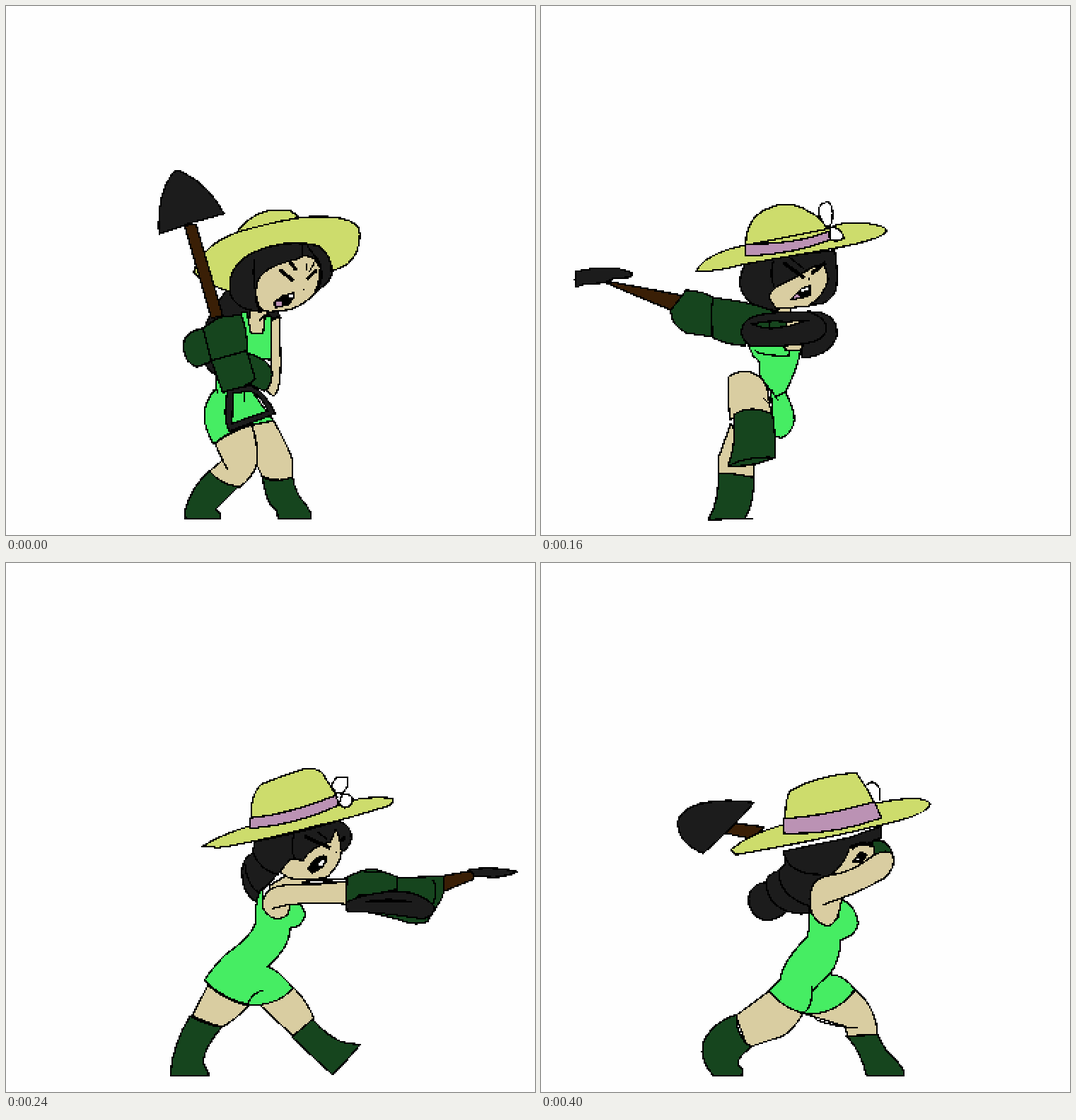
An HTML page with a canvas for the animation above (0.48 s loop, 748 by 748 pixels).

```html
<!DOCTYPE html>
<html lang="en">
<head>
<meta charset="utf-8">
<title>Shovel swing</title>
<style>
html, body { margin: 0; width: 100%; height: 100%; overflow: hidden; background: #fefefe; }
canvas { display: block; width: 748px; height: 748px; image-rendering: pixelated; }
</style>
</head>
<body>
<canvas id="stage" width="374" height="374"></canvas>
<script>
const SIZE = 374, HOLD = 80;

// Fill per letter; "l" is a thin line, "e" a thick one.
const FILL = { h: '#1c1c1c', g: '#16451e', s: '#d9cda1', d: '#46ed63', y: '#cddc6c',
               p: '#bb92b4', b: '#3a1f06', w: '#fefefe', k: '#000' };

// Each line is one part, back to front.
const POSES = [`
h M312,400Q285,440 282,450L281,505Q288,520 298,520L330,440 388,440 380,425Z
y M326,320Q340,297 370,289L400,288 413,297 390,310Z
y M265,377Q275,338 328,319Q400,298 440,297Q500,297 500,322Q500,350 482,365L460,375 316,403Q285,395 270,381Z
s M345,430L368,430 374,440 374,465 340,465Z
s M353,395Q350,430 372,432L392,430Q415,430 440,402L444,370Q430,340 380,340Z
h M316,400Q313,370 345,350Q390,328 440,338Q462,352 460,380Q455,395 437,402Q450,375 441,358L422,352 410,358Q362,368 355,390Q348,420 360,432Q318,428 316,400Z
l M350,358Q348,400 358,425M418,337V356M425,338L443,362Q450,385 440,400
e M386,372L406,388M400,360L410,373M425,386L439,373
l M424,364V374M436,362L428,376M420,400V402
k M378,420L390,410 406,405 407,412 398,422 381,426Z
p M381,425V417L389,416 393,423Z
w M398,406H406V412L400,414Z
l M358,446Q360,438 372,434
s M295,618Q320,600 347,592Q356,620 355,645Q350,665 330,680L300,675 288,657 306,642Z
l M304,640L314,656
s M347,592L378,586Q400,625 404,640V670Q380,672 362,665L354,648Q358,620 347,592Z
g M287,657Q305,678 328,679L296,711 303,718V724H253V712Q262,680 287,657Z
g M362,666Q385,676 405,665Q408,690 425,706L431,718V724H384L383,714Q370,705 366,685Z
s M374,445L386,438 388,500Q388,545 378,551L369,545 374,510Z
d M332,432H340L346,462H363L366,438H374V500L340,495Z
d M296,520L297,541Q276,560 281,590Q287,610 293,619Q310,603 345,592L378,586 340,535Z
l M292,541V548M298,541V548M336,542V560
g M278,455Q252,460 250,480Q252,505 270,510L290,502Z
g M278,455L300,440 332,436Q342,460 340,487L290,501Z
g M340,490Q375,500 376,520Q374,540 365,544L345,535Z
g M290,501L340,487 352,527Q340,540 306,546Z
h M313,543L345,536Q368,546 380,576L315,601Q305,580 313,543ZM321,547L319,590 370,572Q360,550 345,544Z
b M252,310L268,308 306,437 290,441Z
h M236,235Q242,230 252,236Q285,252 308,293Q260,305 216,322Q213,265 236,235Z`, `
h M358,430Q385,440 390,465Q405,478 406,492Q400,515 375,527L357,524Z
l M390,465Q380,482 358,488M399,481Q385,508 358,510M358,470Q372,466 378,448
y M252,357Q255,330 280,315Q310,303 345,312Q360,325 363,342L300,352Z
y M168,402Q172,385 230,366L260,358Q330,346 375,349Q440,352 443,364Q440,377 374,391L250,402 172,408Z
p M250,360Q290,338 352,338L365,348Q300,347 250,360Z
w M364,338Q358,312 366,308Q372,318 369,338Z
w M370,338H384V348H370Z
y M354,342L368,338 370,347H358Z
s M214,465Q215,490 245,495Q265,495 272,488V465Z
s M262,458L355,475 357,494H274Z
s M278,395L285,385 315,375 352,385Q362,420 345,442L285,440 270,425Z
h M245,395Q250,370 290,364Q320,358 360,368Q376,385 380,395Q384,420 372,430L352,442 344,441Q360,420 356,395Q335,392 317,378Q290,384 281,396Q270,410 278,428L262,430Q245,415 245,395Z
l M298,366Q300,380 312,390M340,370L330,388M358,374Q366,400 356,426M264,376Q258,400 270,420
e M280,388L307,409M331,407L348,382
l M340,392H355M320,414V416
k M308,430L316,424 326,428V440L308,436Z
w M310,430L318,426 323,432 310,435Z
s M258,595Q290,594 316,606Q300,640 299,660Q280,672 253,665Q240,630 245,615Z
s M316,606L378,630Q380,640 389,650Q370,675 345,672Q318,650 316,606Z
l M299,645L288,658
g M251,660Q270,677 302,658Q308,690 308,724H253Q258,700 251,660Z
g M345,672Q370,678 391,650Q415,680 428,724H370V710Q368,695 345,672Z
d M276,466Q285,462 295,473L320,478 327,474 340,488 357,491Q358,520 348,543Q378,580 378,602V630Q330,605 258,595Q270,565 295,540Q302,520 300,506Q275,504 273,485Z
l M304,494Q310,513 337,513M378,600V655M348,541L342,548
s M265,425Q310,430 345,442Q357,450 356,490L342,488Q335,475 320,472Q290,462 260,462Z
g M186,404Q160,425 158,455Q170,467 190,462L202,460 201,430 210,404Z
g M178,410Q192,370 212,364Q240,368 245,406L205,404Z
g M205,408Q240,400 270,418Q255,440 266,465L255,471Q210,463 201,455Q200,430 212,405Z
h M113,488Q140,445 170,438Q200,440 202,460L198,492Q190,496 115,494ZM135,481Q150,458 175,454L188,458 187,478Q150,482 135,481Z
b M282,252H302L233,366 215,365Z
h M246,250Q280,210 312,205L336,197Q348,215 346,251Z`, `
h M370,432Q420,428 418,465Q410,495 368,497Z
s M333,422H352V434H333Z
s M335,390L392,358 404,362Q412,385 400,408L378,424 330,428 318,405Z
h M288,364Q345,352 415,345Q420,375 417,400Q408,424 380,422Q400,410 406,385L400,366 384,368Q360,385 335,395Q322,405 322,412L334,430Q295,430 282,400Q278,385 288,364Z
l M328,360Q322,385 330,397M352,356L372,372
e M342,362L372,384M382,378L402,362
l M378,384V388
k M353,414L365,402 380,395 381,408 370,412Z
p M353,415L362,405 368,412Z
w M366,400L378,396V402L366,405Z
y M289,336Q290,300 318,287Q350,272 378,290Q400,300 407,320Q350,345 289,350Z
y M219,375Q230,350 288,338L408,314Q420,306 440,306Q487,307 488,318Q480,330 415,342L285,365Q250,375 219,375Z
p M288,336Q360,337 407,318L408,330Q360,350 288,353Z
w M402,311Q386,290 396,280Q408,272 411,285Q414,300 408,312Z
w M408,312Q425,312 428,328L418,332 408,330Z
s M268,590L250,640V662L300,666 301,645Z
g M250,660Q275,660 300,666Q302,700 288,724H299L236,726Q252,700 250,660Z
d M293,480L368,482Q360,520 345,545Q358,570 358,585Q355,605 340,610L328,608 325,545 308,520Q312,500 300,495Z
s M345,478H371L366,486H345Z
l M302,487Q310,495 350,494V487M325,542L335,558M345,545L332,552
s M264,525Q275,515 295,517Q322,525 322,560L326,577Q290,570 267,585Q264,560 264,525Z
l M314,554L322,562
g M272,578Q295,562 327,577Q332,610 330,638Q300,652 264,650Q276,620 272,578Z
l M264,650Q290,636 330,638
b M90,388L200,409 190,432Q130,408 90,390Z
g M240,412Q300,418 330,432L290,450 288,480Q260,478 242,468Z
g M205,401Q230,403 243,412Q238,440 241,467L205,462Q183,450 183,430Z
h M283,460Q285,440 310,436Q345,430 380,433Q405,440 403,460Q395,475 370,477Q340,482 295,480Q283,470 283,460Z
g M298,449Q325,443 346,446V452Q320,460 298,449Z
s M346,446L376,444 348,453Z
l M322,446V456
h M49,375Q80,368 110,371L128,377 127,383 102,385 88,391 60,393 50,397Q46,390 49,375Z`, `
y M346,362Q345,325 362,312Q390,300 420,291Q445,287 452,305L468,330Q410,362 346,370Z
s M372,456L398,440Q440,452 484,445V460H372Z
w M418,450L482,446V450L420,453Z
s M425,400L465,373 475,390Q478,420 455,443Q430,450 400,445L385,435Q395,415 405,418Z
h M352,393Q400,385 470,364Q490,372 488,390Q480,412 472,404Q474,390 466,376L458,394Q430,400 420,420L402,418Q385,440 362,462L352,478Q333,465 333,435Q335,415 348,410Z
l M349,410Q360,435 385,440M337,423Q340,455 357,466M408,382Q400,400 408,418
e M422,386L458,403M474,394L478,386
l M440,380L454,390M466,407V409
k M427,432Q438,412 452,414Q456,428 432,438Z
w M438,426Q448,414 452,418L447,430Z
p M430,431L436,428 435,435Z
y M278,400Q300,385 345,371Q420,358 470,340Q510,328 545,332Q550,338 540,343Q480,362 435,372Q350,395 300,402Z
p M345,360Q400,355 466,328L470,342Q410,370 345,375Z
w M459,314L467,303 483,302V315L475,326 466,324Z
w M475,327Q490,325 490,335Q488,345 478,346L470,340Z
s M285,597Q310,618 342,626Q320,650 303,656L263,640Z
s M358,624Q390,618 406,600Q430,625 435,645L405,668Z
g M260,640Q285,655 306,654Q280,685 278,705L287,724H232Q235,680 260,640Z
g M404,670L433,645Q455,670 475,677L500,681Q485,700 461,723Q430,695 404,670Z
d M362,460Q352,470 352,510Q345,530 310,553Q285,580 280,590Q310,620 350,625Q390,622 405,600Q385,575 369,570Q400,545 402,515Q420,515 423,495L417,483 400,480 364,480Z
l M340,624Q350,605 364,604M369,570L376,566
s M362,480Q366,457 395,455Q440,455 482,450V482Q440,478 400,483Q402,500 385,503Q363,500 362,480Z
l M376,488L400,482
g M482,443L505,434 520,432 555,444Q590,444 618,442Q622,460 615,475L595,507Q575,513 560,505L480,485Z
l M553,444V460Q530,468 495,470M603,447Q612,460 603,482M505,436H530
h M480,480Q500,468 545,464Q585,462 605,485Q605,498 590,503Q530,493 482,492Z
g M512,478Q540,473 568,478Q540,480 512,478Z
b M618,442L662,434 660,447 618,464Z
h M655,433Q690,428 722,436Q710,442 690,444L662,442Z`, `
b M330,294L342,286 386,319 378,336Z
h M302,262Q325,250 340,254L358,264Q335,285 314,310Q304,290 302,262Z
h M500,380Q530,375 547,382Q550,400 538,418L520,432V420Q532,405 528,392L500,391Z
g M500,388Q530,410 538,435Q535,455 525,458L475,460 478,445Z
y M376,354Q380,310 425,296Q465,288 482,300Q498,315 504,330Q440,360 376,362Z
s M412,453L435,462 430,475 400,475Z
s M460,420L455,392 503,383Q505,420 490,440L470,455Q440,462 418,455Q440,440 460,420Z
h M372,393L505,372 502,390 470,388Q460,395 458,418Q430,450 412,455L392,487Q360,498 345,480Q340,460 348,440Q355,425 372,415Q368,405 372,393Z
l M372,410Q380,440 415,450M360,430Q365,470 395,480M347,457Q355,480 368,492M455,388Q448,405 458,418
e M468,388L497,401M488,396L498,390
k M465,441L472,428 488,424 484,434Z
p M468,440L472,433 477,434 474,441Z
y M307,391Q340,375 372,370Q450,362 510,345Q565,333 577,345Q570,356 510,363Q400,385 308,403Z
p M373,352Q440,348 505,327L513,347Q440,372 373,376Z
w M491,313L502,300 508,302V320L502,326Z
w M508,322Q520,325 520,338L512,346 507,332Z
s M330,606Q350,626 386,628Q375,665 358,680L318,687 302,642 325,638Z
s M407,628Q440,620 453,597Q482,615 482,662L440,668 433,645Z
g M301,640L316,687Q285,690 284,705V724Q262,710 256,680Q260,645 301,640Z
g M441,670L481,662Q487,695 500,705L515,718V724H461Q455,700 441,670Z
d M392,473Q385,490 385,515Q375,540 342,565Q330,600 330,607Q350,628 405,628Q440,620 452,597Q430,575 417,574Q430,560 435,538Q458,535 458,515Q450,495 440,495L425,500 402,520 398,473Z
l M374,597Q395,592 419,572M395,588V606
s M400,480Q405,465 435,465Q470,460 490,445Q515,432 520,460Q518,490 495,492Q460,490 428,500Q425,520 412,523Q397,520 400,480Z
l M424,500L440,496
w M438,461L474,456V461L440,465Z`, `
b M272,367L315,373 300,390 262,382Z
h M301,338Q270,375 229,410Q192,395 193,365Q205,328 301,338Z
y M345,362Q345,330 353,321Q390,300 445,296L460,318 472,340Q410,366 345,372Z
s M437,395Q460,400 475,388L472,410 450,432Q430,440 405,440Q430,420 437,395Z
h M343,407L435,388 480,372V388L462,396 437,400Q430,425 410,440L385,452 378,494Q365,498 348,492Q325,512 305,500Q288,485 295,465Q305,450 318,452Q318,440 335,435L345,425Z
l M343,410Q350,440 395,440M336,435Q335,470 380,485M318,452Q320,485 352,493
e M438,404Q450,392 470,400
k M440,422L452,408 460,412 453,424Z
w M443,421L448,415 452,420Z
g M468,392Q488,388 496,408L472,412Z
y M268,405Q290,385 340,370Q400,362 470,340Q540,325 550,340Q548,355 480,370Q400,390 275,412Z
p M343,361Q400,358 471,337L481,360Q410,385 343,382Z
l M460,314Q470,303 478,318V336
s M322,605Q340,625 370,637Q350,670 330,672L292,685 275,640Z
s M376,638Q425,632 444,603Q475,630 475,667L433,668 430,655Z
l M388,645Q415,656 448,657
g M276,638Q275,670 297,684Q268,705 284,715V724H243Q225,705 228,680Q240,650 276,638Z
g M432,669L476,666Q485,690 500,700L513,718V724H460Q452,690 432,669Z
d M379,490Q380,515 376,528Q340,565 338,588L322,604Q345,635 385,637Q425,632 443,602Q430,583 408,581Q423,560 423,533Q448,525 448,508Q445,485 424,474L420,500Q405,520 390,505Z
l M372,635Q384,628 383,598M383,606Q395,590 408,581
s M380,480Q378,450 400,443Q440,437 460,420Q485,400 497,412Q503,430 485,445Q450,465 425,473Q420,510 405,513Q382,508 380,480Z
l M398,483L425,473`];

function makeCtx() {
  const c = document.createElement('canvas');
  c.width = c.height = SIZE;
  return c.getContext('2d', { willReadFrequently: true });
}

const layer = makeCtx();

// Draws one part with hard pixel edges.
function stamp(target, draw) {
  layer.setTransform(1, 0, 0, 1, 0, 0);
  layer.clearRect(0, 0, SIZE, SIZE);
  layer.setTransform(.5, 0, 0, .5, .2, .2);
  draw();
  const img = layer.getImageData(0, 0, SIZE, SIZE), px = img.data;
  for (let i = 3; i < px.length; i += 4) px[i] = px[i] > 105 ? 255 : 0;
  layer.putImageData(img, 0, 0);
  target.drawImage(layer.canvas, 0, 0);
}

function render(pose) {
  const ctx = makeCtx();
  ctx.fillStyle = '#fefefe';
  ctx.fillRect(0, 0, SIZE, SIZE);
  for (const part of pose.trim().split('\n')) {
    const kind = part[0], path = new Path2D(part.slice(2));
    if (FILL[kind]) stamp(ctx, () => {
      layer.fillStyle = FILL[kind];
      layer.fill(path, 'evenodd');
    });
    stamp(ctx, () => {
      layer.strokeStyle = '#000';
      layer.lineWidth = kind === 'e' ? 5 : 2.1;
      layer.stroke(path);
    });
  }
  return ctx.canvas;
}

const frames = POSES.map(render);
const stage = document.getElementById('stage').getContext('2d');
let start;

function play(now) {
  start ??= now;
  stage.drawImage(frames[Math.floor((now - start) / HOLD) % frames.length], 0, 0);
  requestAnimationFrame(play);
}
stage.drawImage(frames[0], 0, 0);
requestAnimationFrame(play);
</script>
</body>
</html>
```
